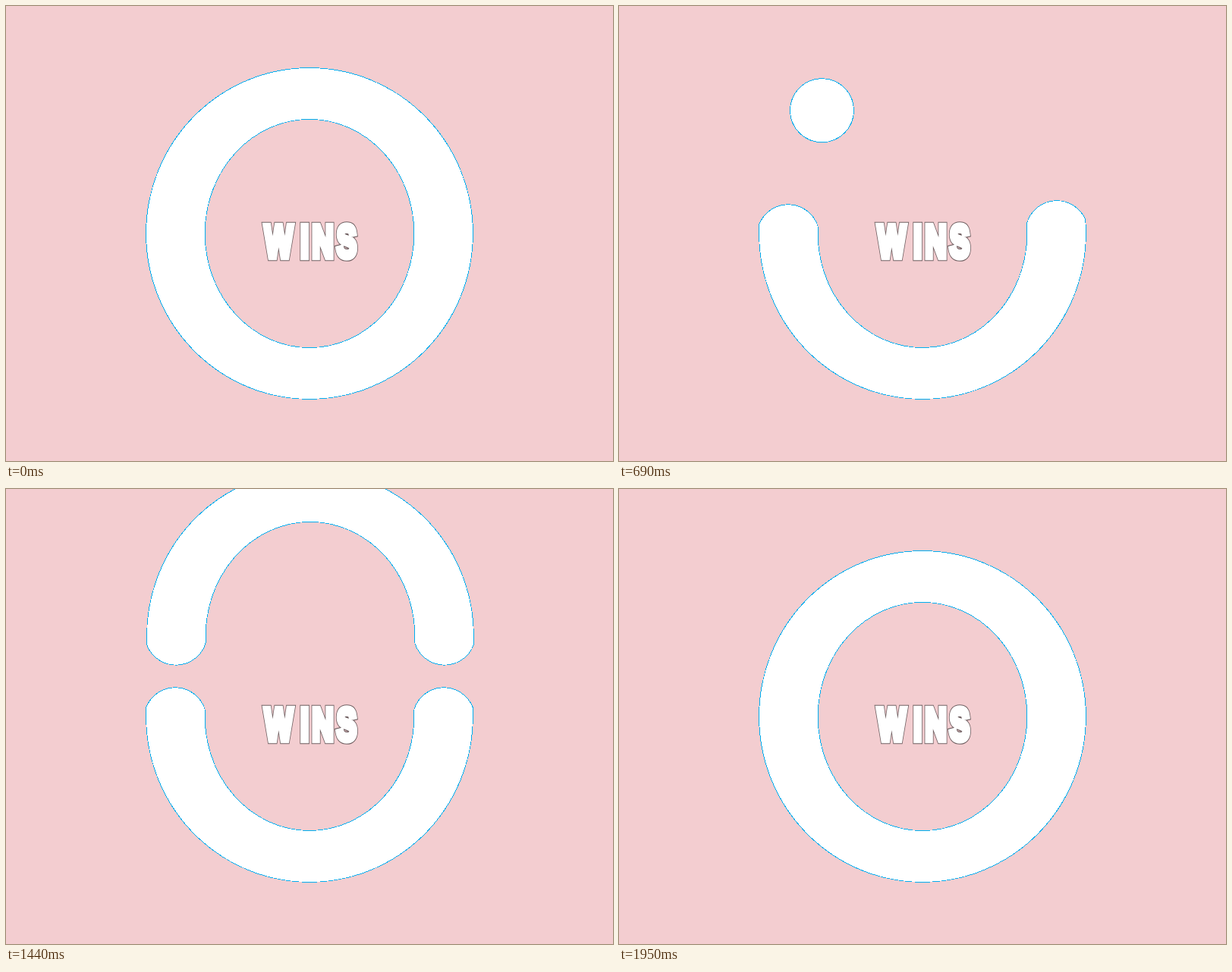
Recreate the animation shown at these times as an HTML page. Size 800 by 600 pixels, loop 2130 ms.

```html
<!DOCTYPE html>
<html lang="en">
<head>
<meta charset="utf-8">
<title>Wins</title>
<style>
  html, body { margin: 0; width: 100%; height: 100%; overflow: hidden; background: #f3cdd0; }
  svg { display: block; width: 800px; height: 600px; }
  .shape {
    fill: #fff;
    stroke: #00aeef;
    stroke-width: 1.8;
    paint-order: stroke;
    shape-rendering: crispEdges;
  }
  #word {
    font: 700 59px "Liberation Sans", Arial, sans-serif;
    text-anchor: middle;
    vector-effect: non-scaling-stroke;
  }
  .edge { fill: #706062; stroke: #706062; stroke-width: 9; }
  .face { fill: #fff; stroke: #fff; stroke-width: 7; }
</style>
</head>
<body>
<svg viewBox="0 0 800 600">
  <defs>
    <text id="word" x="-61.5 -9.8 26.5 74.3" transform="translate(400 331.3) scale(.66 1)">WINS</text>
  </defs>
  <path id="band" class="shape"/>
  <circle id="ball" class="shape" r="41.6"/>
  <use href="#word" class="edge"/>
  <use href="#word" class="face"/>
</svg>
<script>
  const LOOP = 2130, STEP = 30;
  const CX = 400, CY = 300, FLOOR = 518;
  const OUTER = [215, 218], INNER = [138.3, 151];
  const CAP = 40.5, TIP = 3.2;
  const LAND = 1505;

  const band = document.getElementById('band');
  const ball = document.getElementById('ball');

  // Angle of the right-hand end of the lower arc.
  const endKeys = [[0, -176.8], [280, 75], [498, -4.2], [690, -4.8], [900, -3.2]];
  // Sideways bulge of the closed ring after the landing.
  const bulgeKeys = [[1410, -.052], [1600, .052], [1710, -.0245], [1830, .008], [1950, 0]];

  function ease(keys, t) {
    const i = keys.findIndex(k => k[0] > t);
    if (i < 0) return keys[keys.length - 1][1];
    if (i === 0) return keys[0][1];
    const [t0, a] = keys[i - 1], [t1, b] = keys[i];
    return a + (b - a) * (1 - Math.cos(Math.PI * (t - t0) / (t1 - t0))) / 2;
  }

  function ellipse(rx, ry, cy, sweep) {
    const half = x => `A${rx} ${ry} 0 1 ${sweep} ${x} ${cy}`;
    return `M${CX - rx} ${cy}${half(CX + rx)}${half(CX - rx)}Z`;
  }

  function ring(bulge) {
    const sx = 1 + bulge, sy = 1 - 1.92 * bulge;
    const cy = FLOOR - OUTER[1] * sy;
    return ellipse(OUTER[0] * sx, OUTER[1] * sy, cy, 1) +
           ellipse(INNER[0] * sx, INNER[1] * sy, cy, 0);
  }

  // Part of the ring, clockwise from one angle to another, with rounded ends.
  function arc(from, to, dx = 0, dy = 0) {
    const point = ([rx, ry], deg) => {
      const a = deg * Math.PI / 180;
      return `${CX + dx + rx * Math.cos(a)} ${CY + dy + ry * Math.sin(a)}`;
    };
    const large = to - from > 180 ? 1 : 0;
    const cap = `A${CAP} ${CAP} 0 0 1 `;
    return `M${point(OUTER, from)}A${OUTER} 0 ${large} 1 ${point(OUTER, to)}` +
           cap + point(INNER, to) +
           `A${INNER} 0 ${large} 0 ${point(INNER, from)}` +
           cap + point(OUTER, from) + 'Z';
  }

  function bandPath(t) {
    if (t === 0) return ring(0);
    if (t >= LAND) return ring(ease(bulgeKeys, t));
    const lower = arc(ease(endKeys, t), 180 + TIP);
    if (t < 1110) return lower;
    const drop = -350 + .00224 * (t - 1110) ** 2;
    return lower + arc(180 - TIP, 360 + TIP, 1, drop);
  }

  // Thrown in from the left, bounces on the left tip, then the right one, and out.
  function ballAt(t) {
    if (t < 642) {
      const u = t - 450;
      return [146.5 + .42 * u - (u < 0 ? .00227 * u * u : 0), 76 + .0062 * (t - 488) ** 2];
    }
    if (t < 1023) {
      const u = t - 690;
      return [267.5 + .822 * u, 137.7 - 1.52 * u + .0053 * u * u];
    }
    const u = t - 1023;
    return [541 + .25 * u, 220 - 2.8 * u];
  }

  function draw(now) {
    const t = Math.floor(now % LOOP / STEP) * STEP;
    const [x, y] = ballAt(t);
    band.setAttribute('d', bandPath(t));
    ball.setAttribute('cx', x);
    ball.setAttribute('cy', y);
  }

  const start = performance.now();
  function tick() {
    draw(performance.now() - start);
    requestAnimationFrame(tick);
  }
  tick();
</script>
</body>
</html>
```
